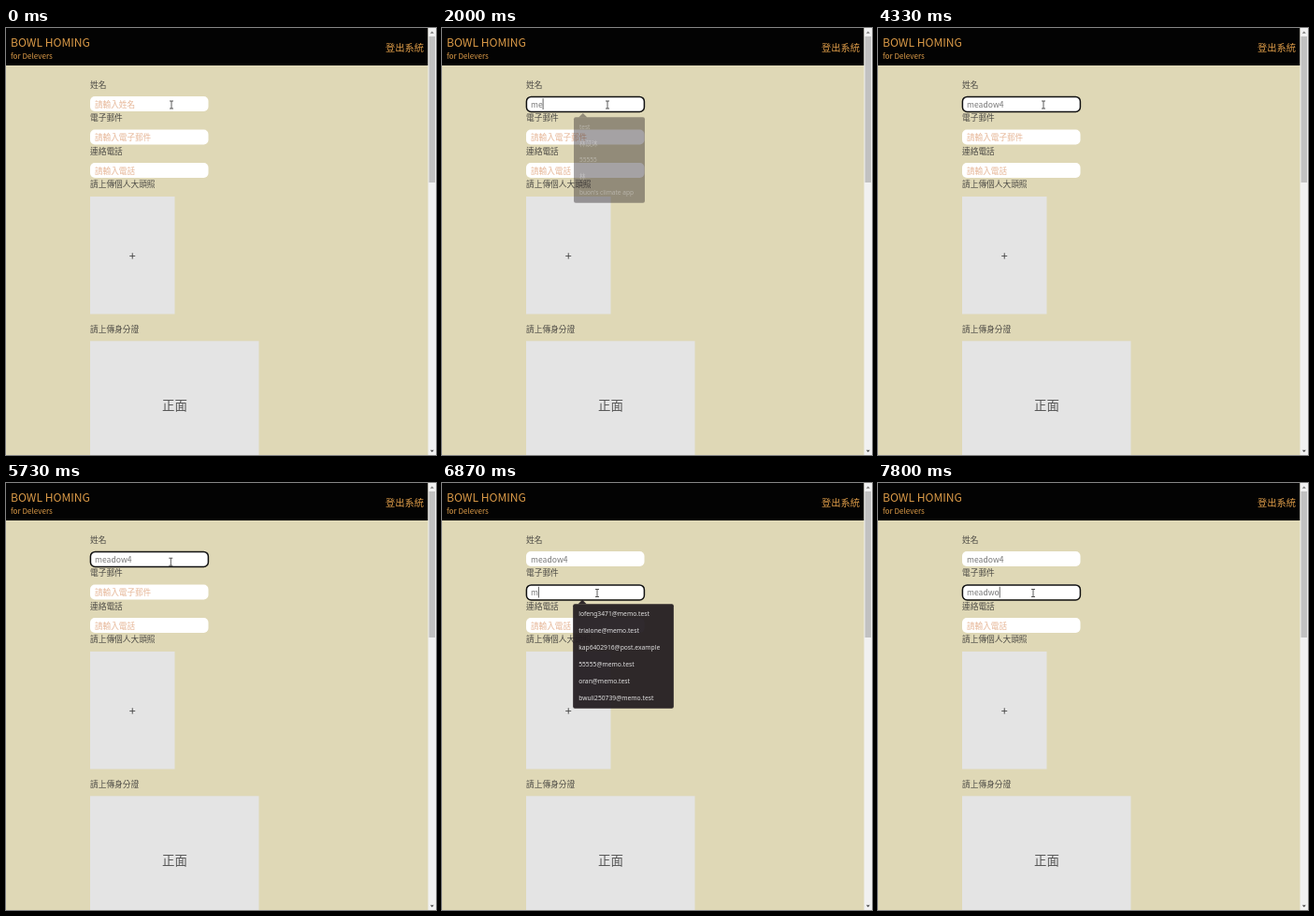
Write an HTML page with a canvas that moves like this. It is 460x456 px and loops after 8 s.

```html
<!DOCTYPE html>
<html lang="zh-Hant">
<head>
<meta charset="utf-8">
<style>
html, body { margin: 0; width: 100%; height: 100%; overflow: hidden; background: #dfd8b6; }
canvas { display: block; }
</style>
</head>
<body>
<canvas id="stage" width="460" height="456"></canvas>
<script>
const ctx = document.getElementById('stage').getContext('2d');
const LOOP = 8000, BLINK = 530, FADE = 170;
const CJK = '"Noto Sans CJK TC", "Noto Sans CJK JP", "Noto Sans CJK", sans-serif';
const SANS = '"Noto Sans", "Noto Sans CJK TC", sans-serif';
const ORANGE = '#dc9b48';

const fields = [
  { y: 73, label: '姓名', hint: '請輸入姓名', value: 'meadow4',
    keys: [1870, 1960, 2130, 3070, 3270, 3530, 3800], focus: 1270, blur: 6210 },
  { y: 108.5, label: '電子郵件', hint: '請輸入電子郵件', value: 'meadwo',
    keys: [6870, 6940, 7070, 7270, 7470, 7800], focus: 6210, blur: LOOP },
  { y: 144, label: '連絡電話', hint: '請輸入電話', value: '', keys: [], focus: LOOP, blur: LOOP }
];

const menus = [
  { y: 94, w: 78, open: 1270, close: 1900,
    items: ['test', '林苡沐', '55555', '林', "buon's climate app"] },
  { y: 129, w: 108, open: 6230, close: 6860,
    items: ['lofeng3471@memo.test', 'trialone@memo.test', 'kap6402916@post.example',
            '55555@memo.test', 'oran@memo.test', 'bwuli250739@memo.test'] }
];

function rect(x, y, w, h, color) {
  ctx.fillStyle = color;
  ctx.fillRect(x, y, w, h);
}

function roundRect(x, y, w, h, r, color) {
  ctx.fillStyle = color;
  ctx.beginPath();
  ctx.roundRect(x, y, w, h, r);
  ctx.fill();
}

function triangle(x, y, half, height, color) {
  ctx.fillStyle = color;
  ctx.beginPath();
  ctx.moveTo(x, y);
  ctx.lineTo(x - half, y + height);
  ctx.lineTo(x + half, y + height);
  ctx.fill();
}

function text(str, x, y, size, color, { weight = 400, family = CJK, align = 'left' } = {}) {
  ctx.font = `${weight} ${size}px ${family}`;
  ctx.textAlign = align;
  ctx.fillStyle = color;
  ctx.fillText(str, x, y);
}

function drawPage() {
  rect(0, 0, 460, 456, '#dfd8b6');
  rect(0, 0, 451.5, 40, '#030303');
  text('BOWL HOMING', 5, 19.7, 12.1, ORANGE);
  text('for Delevers', 5, 33, 8.1, ORANGE, { weight: 500 });
  text('登出系統', 447, 24.7, 10.25, ORANGE, { weight: 500, align: 'right' });

  rect(451.5, 0, 8.5, 456, '#f1f1f1');
  rect(452.5, 9, 6.5, 156, '#c1c1c1');
  triangle(455.8, 3.5, 2, 2.2, '#777');
  triangle(455.8, 453, 2, -2.2, '#444');

  text('請上傳個人大頭照', 90, 170.3, 8.7, '#4c4a45');
  rect(90, 180, 90.5, 125.5, '#e4e4e4');
  text('+', 135.3, 247.7, 12.5, '#444', { align: 'center' });
  text('請上傳身分證', 90, 324.6, 8.7, '#4c4a45');
  rect(90, 334.3, 180.5, 122, '#e4e4e4');
  text('正面', 180.5, 407.6, 13.4, '#555', { align: 'center' });
}

function drawField({ y, label, hint, value, keys, focus, blur }, t) {
  text(label, 90, y === 73 ? 63.7 : y - 9.2, 8.7, '#4c4a45');
  roundRect(90, y, 126.5, 16, 5, '#fff');

  const typed = value.slice(0, keys.filter(k => t >= k).length);
  if (typed) text(typed, 95, y + 11.6, 8.6, '#777', { weight: 300 });
  else text(hint, 95, y + 11.7, 8.6, '#e6b697', { weight: 300 });

  if (t < focus || t >= blur) return;
  ctx.strokeStyle = '#111';
  ctx.lineWidth = 1.5;
  ctx.beginPath();
  ctx.roundRect(90.4, y + 0.4, 126, 16, 5);
  ctx.stroke();

  const lastInput = Math.max(focus, ...keys.filter(k => t >= k));
  if (Math.floor((t - lastInput) / BLINK) % 2 === 0) {
    ctx.font = `300 8.6px ${CJK}`;
    rect(95 + ctx.measureText(typed).width, y + 2.3, 0.7, 11.7, '#222');
  }
}

function drawMenu({ y, w, open, close, items }, t) {
  const gone = Math.max(0, (t - close) / FADE);
  if (t < open || gone >= 1) return;
  const h = items.length * 18 + 4, cx = 140 + w / 2, cy = y + h / 2;
  const scale = 1 - 0.045 * gone;

  ctx.save();
  ctx.globalAlpha = 1 - gone;
  ctx.translate(cx, cy);
  ctx.scale(scale, scale);
  ctx.translate(-cx, -cy);
  triangle(150, y - 4.5, 4.5, 4.6, '#231c20');
  roundRect(140, y, w, h, 2, '#231c20');
  items.forEach((item, i) =>
    text(item, 146, y + 13.2 + i * 18, 6.75, '#eee', { family: SANS }));
  ctx.restore();
}

function drawPointer(t) {
  const p = Math.min(1, Math.max(0, (t - 5670) / 400));
  const ease = p * p * (3 - 2 * p);
  const x = 177 - 11 * ease, y = 82 + 35.5 * ease;
  ctx.strokeStyle = '#333';
  ctx.lineWidth = 0.8;
  ctx.beginPath();
  ctx.moveTo(x, y - 4);
  ctx.lineTo(x, y + 4);
  for (const end of [-4, 4]) {
    ctx.moveTo(x - 2, y + end);
    ctx.lineTo(x + 2, y + end);
  }
  ctx.stroke();
}

function frame(now) {
  const t = now % LOOP;
  drawPage();
  fields.forEach(f => drawField(f, t));
  menus.forEach(m => drawMenu(m, t));
  drawPointer(t);
  requestAnimationFrame(frame);
}

const start = performance.now();
const tick = frame;
requestAnimationFrame(tick);
</script>
</body>
</html>
```
